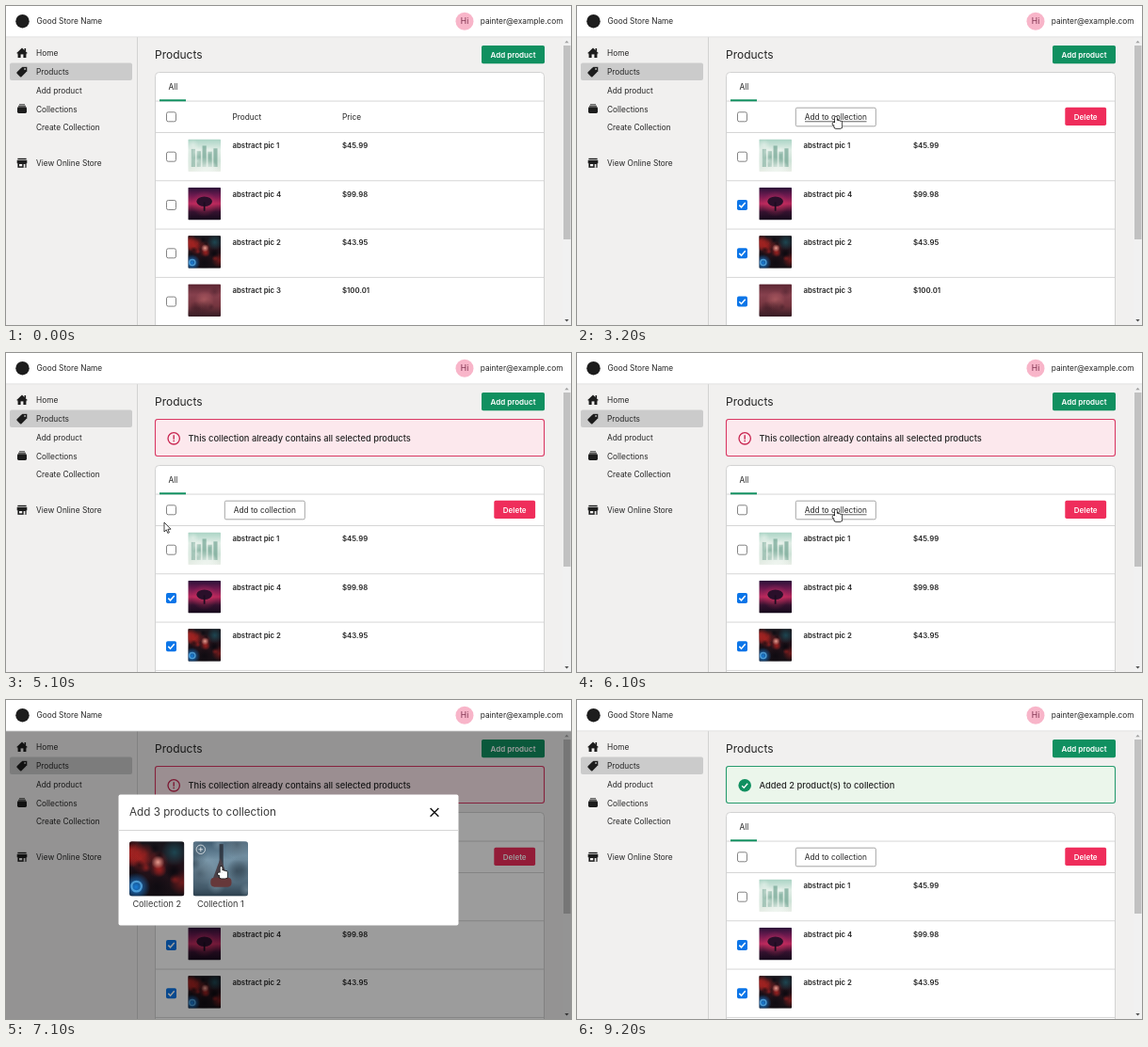
Animation, 600 px wide and 339 px high, one loop 9.3 s. Source, as an HTML page with a canvas:

```html
<!DOCTYPE html>
<html lang="en">
<head>
<meta charset="utf-8">
<title>Store products</title>
<style>
  html, body { margin: 0; width: 100%; height: 100%; overflow: hidden; }
  canvas { display: block; width: 600px; height: 339px; }
</style>
</head>
<body>
<canvas id="stage"></canvas>
<script>
const W = 600, H = 339, LOOP = 9300, STEP = 100, TAU = Math.PI * 2;
const canvas = document.getElementById('stage');
const ratio = window.devicePixelRatio || 1;
canvas.width = W * ratio;
canvas.height = H * ratio;
const c = canvas.getContext('2d');

const INK = '#252525', SOFT = '#3a3a3a', ICON = '#1d1d1d', GREEN = '#109060', RED = '#ef2d5b';
const PAGE = '#f1f0ef', LINE = '#d2d2d2', MARK = '#cbcbcb';
const TABLE = 70.5, ROWS = 134, ROW = 51.3, SHIFT = 49, THUMB = 58.4;

const menu = ['Home', 'Products', 'Add product', 'Collections', 'Create Collection', 'View Online Store'];
const menuIcons = [houseIcon, tagIcon, null, stackIcon, null, shopIcon];
const menuY = i => 50 + 19.8 * (i === 5 ? 5.9 : i);

const products = [
  { name: 'abstract pic 1', price: '$45.99', art: mist },
  { name: 'abstract pic 4', price: '$99.98', art: tree },
  { name: 'abstract pic 2', price: '$43.95', art: nebula },
  { name: 'abstract pic 3', price: '$100.01', art: dusk }
];
const collections = [{ name: 'Collection 2', art: nebula }, { name: 'Collection 1', art: sea }];

// Moments of the story
const FIRST_CHECK = 900, CHECK_GAP = 600;
const OPEN_1 = 3300, CLOSE_1 = 4900, OPEN_2 = 6200, CLOSE_2 = 7700;
const checkTime = i => i ? FIRST_CHECK + (i - 1) * CHECK_GAP : Infinity;

// Pointer targets
const checkSpot = i => ({ x: 175, y: ROWS + ROW * i + 26 });
const buttonSpot = shift => ({ x: 275, y: 117.5 + shift });
const thumbX = i => 131 + i * 67.6;
const thumbSpot = i => ({ x: thumbX(i) + 30, y: 177 });

// The pointer rests at each stop from arrive to leave and glides between stops
const stops = [
  { arrive: 400, leave: 400, to: { x: 232, y: 236 } },
  ...[1, 2, 3].map(i => ({ arrive: checkTime(i) - 100, leave: checkTime(i) + 100, to: checkSpot(i) })),
  { arrive: 3100, leave: OPEN_1, to: buttonSpot(0) },
  { arrive: 3900, leave: 4000, to: thumbSpot(1) },
  { arrive: 4600, leave: CLOSE_1, to: thumbSpot(0) },
  { arrive: 5100, leave: 5100, to: { x: 168, y: 180 } },
  { arrive: 5900, leave: OPEN_2, to: buttonSpot(SHIFT) },
  { arrive: 6800, leave: CLOSE_2, to: thumbSpot(1) },
  { arrive: 8100, leave: 8200, to: { x: 264, y: 111 } },
  { arrive: 9000, leave: 9000, to: { x: 0, y: H } }
];

const ease = p => p * p * (3 - 2 * p);
const mix = (a, b, p) => a + (b - a) * p;

function pointerAt(t) {
  const i = stops.findIndex(s => t < s.arrive);
  if (i < 1) return null;
  const from = stops[i - 1], next = stops[i];
  const p = ease(Math.max(0, (t - from.leave) / (next.arrive - from.leave)));
  return { x: mix(from.to.x, next.to.x, p), y: mix(from.to.y, next.to.y, p) };
}

const inside = (p, x, y, w, h) => !!p && p.x >= x && p.x <= x + w && p.y >= y && p.y <= y + h;
const overThumb = (p, i) => inside(p, thumbX(i), 150, THUMB, THUMB);
const overButton = (p, shift) => inside(p, 232, 108 + shift, 86, 20);

function random(seed) {
  return () => (seed = (seed * 16807) % 2147483647) / 2147483647;
}

function text(s, x, y, { size = 8.3, weight = 400, color = INK, align = 'left' } = {}) {
  c.font = `${weight} ${size}px Inter, sans-serif`;
  c.fillStyle = color;
  c.textAlign = align;
  c.fillText(s, x, y);
}

function paint(fill, stroke, width = 1) {
  if (fill) { c.fillStyle = fill; c.fill(); }
  if (stroke) { c.strokeStyle = stroke; c.lineWidth = width; c.stroke(); }
}

function rect(x, y, w, h, fill) {
  c.fillStyle = fill;
  c.fillRect(x, y, w, h);
}

function box(x, y, w, h, r, ...style) {
  c.beginPath();
  c.roundRect(x, y, w, h, r);
  paint(...style);
}

function disc(x, y, r, ...style) {
  c.beginPath();
  c.arc(x, y, r, 0, TAU);
  paint(...style);
}

function shape(points, ...style) {
  c.beginPath();
  points.forEach(([x, y]) => c.lineTo(x, y));
  c.closePath();
  paint(...style);
}

function triangle(x, y, half, height, fill) {
  shape([[x - half, y + height], [x, y], [x + half, y + height]], fill);
}

function at(x, y, draw, scale = 1, turn = 0) {
  c.save();
  c.translate(x, y);
  c.scale(scale, scale);
  c.rotate(turn);
  draw();
  c.restore();
}

function tick(x, y, size, width) {
  c.beginPath();
  c.moveTo(x - size, y);
  c.lineTo(x - size * .3, y + size * .7);
  c.lineTo(x + size, y - size * .8);
  paint(null, '#fff', width);
}

function cross(x, y, size, color, width, turn = 0) {
  at(x, y, () => {
    rect(-size, -width / 2, size * 2, width, color);
    rect(-width / 2, -size, width, size * 2, color);
  }, 1, turn);
}

// Pictures live in a unit square
function shade(...colors) {
  const g = c.createLinearGradient(0, 0, 0, 1);
  colors.forEach((k, i) => g.addColorStop(i / (colors.length - 1), k));
  rect(0, 0, 1, 1, g);
}

function glow(x, y, r, rgb, alpha) {
  const g = c.createRadialGradient(x, y, 0, x, y, r);
  g.addColorStop(0, `rgba(${rgb},${alpha})`);
  g.addColorStop(1, `rgba(${rgb},0)`);
  rect(0, 0, 1, 1, g);
}

function clouds(seed, count, radius, rgb, alpha, slope = 0) {
  const rnd = random(seed);
  for (let i = 0; i < count; i++) {
    const x = rnd();
    const y = slope ? .15 + x * slope + (rnd() - .5) * .4 : rnd();
    glow(x, y, radius * (.5 + rnd()), rgb, alpha);
  }
}

function mist() {
  shade('#a9d3c4', '#e2eee7', '#cfe3d8', '#e9eee7');
  for (let i = 0; i < 5; i++) {
    const top = .3 + .1 * Math.sin(i * 2.4);
    rect(.1 + i * .17, top, .12, .85 - top, 'rgba(86,146,126,.55)');
  }
  clouds(5, 6, .22, '240,246,241', .5);
  glow(.5, 1, .45, '240,246,241', .9);
}

function tree() {
  shade('#2a1238', '#6f1a50', '#b8285c', '#34122f', '#150a1b');
  glow(.5, .5, .4, '240,60,100', .45);
  c.beginPath();
  c.ellipse(.5, .43, .24, .15, 0, 0, TAU);
  paint('#2a0f2a');
  rect(.475, .45, .05, .27, '#1c0c20');
}

function nebula() {
  shade('#17151b', '#24121a', '#140f14');
  clouds(11, 14, .17, '195,38,34', .5, .7);
  clouds(23, 9, .16, '8,8,14', .6);
  glow(.82, .2, .25, '30,110,125', .55);
  glow(.52, .38, .12, '255,185,170', .8);
  glow(.12, .83, .26, '25,125,215', 1);
  disc(.13, .82, .09, null, 'rgba(110,200,255,.6)', .04);
}

function dusk() {
  shade('#5b2733', '#86404d', '#74353f', '#351c24');
  glow(.5, .5, .3, '215,120,120', .45);
  clouds(7, 6, .2, '50,22,32', .35);
}

function sea() {
  shade('#3f5b70', '#7391a4', '#5f7a8c', '#2c3f4d');
  clouds(31, 7, .22, '160,185,200', .4);
  clouds(17, 6, .2, '35,50,62', .45);
  rect(.48, .05, .07, .5, 'rgba(42,48,58,.85)');
  triangle(.5, .3, .14, .38, '#4a4148');
  box(.32, .66, .38, .17, .07, '#66383a');
}

function picture(art, x, y, size, radius) {
  c.save();
  c.beginPath();
  c.roundRect(x, y, size, size, radius);
  c.clip();
  at(x, y, art, size);
  c.restore();
}

function checkbox(x, y, on) {
  if (!on) return box(x + .5, y + .5, 10, 10, 1.8, '#fff', '#777', .9);
  box(x, y, 11, 11, 1.8, '#0b75e8');
  tick(x + 5.5, y + 5.6, 3.2, 1.5);
}

function houseIcon() {
  triangle(0, -5.5, 6, 5.8, ICON);
  for (const x of [-4.4, 1.4]) rect(x, 0, 3, 5, ICON);
  rect(-4.4, 0, 8.8, 1.4, ICON);
  rect(2.5, -5, 1.6, 3, ICON);
}

function tagIcon() {
  at(0, 0, () => box(-5.2, -3.4, 10, 6.8, [1, 3, 3, 1], ICON), 1, -TAU / 8);
  rect(.2, -5, 5.1, 5, ICON);
  disc(3.1, -2.9, .9, MARK);
}

function stackIcon() {
  box(-5, -2.2, 10, 6.7, 1.4, ICON);
  for (const i of [0, 1]) rect(i - 4, -3.6 - 1.4 * i, 8 - 2 * i, .9, ICON);
}

function shopIcon() {
  rect(-4.6, -5, 9.2, 1.3, ICON);
  rect(-5.3, -3, 10.6, 3.4, ICON);
  rect(-4.6, 0, 9.2, 5, ICON);
  rect(-3, 1.2, 3.2, 2.3, PAGE);
  rect(1.7, 1.2, 1.7, 3.8, PAGE);
}

function header() {
  rect(0, 0, W, 33, '#fff');
  rect(0, 32.5, W, .8, '#d9d9d9');
  disc(17.5, 16.2, 7.2, ICON);
  text('Good Store Name', 32.5, 19.3);
  disc(487, 16.3, 9.5, '#f8b5c9');
  text('Hi', 487, 19.4, { size: 8.5, color: '#7c304c', align: 'center' });
  text('painter@example.com', 591.5, 19.3, { align: 'right' });
}

function sidebar() {
  rect(139, 33, 1, H, LINE);
  box(4, 60.5, 130, 18.5, 2, MARK);
  menu.forEach((label, i) => {
    if (menuIcons[i]) at(17, menuY(i), menuIcons[i]);
    text(label, 32, menuY(i) + 3.1);
  });
}

function scrollbar(thumbEnd) {
  rect(591, 33, 9, H, '#f1f1f1');
  rect(592, 42, 7.5, thumbEnd - 42, '#c1c1c1');
  triangle(595.5, 36.8, 2.2, 2.5, '#a3a3a3');
  triangle(595.5, 335.5, 2.2, -2.5, '#505050');
}

function button(label, x, y, w, fill) {
  box(x, y, w, 19.2, 1.8, fill);
  text(label, x + w / 2, y + 12.7, { size: 8, weight: 600, color: '#fff', align: 'center' });
}

function banner(ok) {
  const x = 178.2, y = 90.8, mark = '#c82550';
  box(158.5, TABLE, 413, 39, 2.5, ok ? '#ebf6eb' : '#fce8ed', ok ? '#279b6e' : '#d93863', 1.1);
  if (ok) {
    disc(x, y, 6.8, GREEN);
    tick(x, y + .4, 3, 1.3);
  } else {
    disc(x, y, 6.2, null, mark, 1.3);
    rect(x - .7, y - 3.6, 1.4, 4.5, mark);
    rect(x - .7, y + 1.9, 1.4, 1.5, mark);
  }
  const message = ok ? 'Added 2 product(s) to collection' : 'This collection already contains all selected products';
  text(message, 193.5, 94.2, { size: 9.33, weight: 500 });
}

function actions(hover) {
  box(232.3, 108.2, 85, 19.6, 1.5, '#fff', '#9b9b9b', .9);
  text('Add to collection', 274.8, 121.3, { align: 'center' });
  if (hover) rect(242, 122.5, 65.5, .7, INK);
  button('Delete', 518.3, 107.8, 43.8, RED);
}

function table(t, hover) {
  box(158.5, TABLE, 413, 320, 4, '#fff', LINE);
  text('All', 172.5, 88.7);
  rect(159, 100.6, 412, .9, LINE);
  rect(163, 99.3, 28, 2, GREEN);
  checkbox(170, 112.3, false);
  if (t >= FIRST_CHECK) {
    actions(hover);
  } else {
    text('Product', 240.5, 121);
    text('Price', 357, 121);
  }
  products.forEach((p, i) => {
    const y = ROWS + i * ROW;
    const bold = { size: 7.8, weight: 600 };
    rect(159, y, 412, .9, LINE);
    checkbox(170, y + 20.7, t >= checkTime(i));
    picture(p.art, 193.3, y + 7.5, 34.7, 1);
    text(p.name, 240.5, y + 17.3, bold);
    text(p.price, 357, y + 17.3, bold);
  });
}

function modal(pointer) {
  rect(0, 33, W, H - 33, 'rgba(0,0,0,.39)');
  box(119.5, 100.5, 361, 139, 2, '#fff');
  rect(119.5, 138, 361, .9, LINE);
  text('Add 3 products to collection', 131, 123.3, { size: 11.7, color: SOFT });
  cross(455, 119.4, 6.2, '#111', 1.4, TAU / 8);
  collections.forEach(({ name, art }, i) => {
    const x = thumbX(i), ink = 'rgba(255,255,255,.75)';
    picture(art, x, 150.2, THUMB, 3);
    text(name, x + THUMB / 2, 220.3, { size: 9.2, color: SOFT, align: 'center' });
    if (!overThumb(pointer, i)) return;
    disc(x + 8.2, 158.8, 4.7, null, ink, .9);
    cross(x + 8.2, 158.8, 2.4, ink, .9);
  });
}

function arrow() {
  shape([[0, 0], [0, 10], [2.3, 7.9], [3.8, 11.4], [5.4, 10.7], [3.9, 7.3], [7, 7.2]], '#fff', '#151515', .8);
}

function hand() {
  c.beginPath();
  for (let i = 0; i < 4; i++) c.roundRect(i * 1.8 - 1, i ? 3.6 + i * .5 : 0, 1.9, 7, .9);
  c.roundRect(-3.6, 6.4, 4, 2.6, 1.2);
  c.roundRect(-1.8, 7, 8, 5.6, 2);
  paint(null, '#151515', 1.5);
  paint('#fff');
}

function render(t) {
  const pointer = pointerAt(t);
  const open = (t >= OPEN_1 && t < CLOSE_1) || (t >= OPEN_2 && t < CLOSE_2);
  const notice = t >= CLOSE_1;
  const shift = notice ? SHIFT : 0;
  const onButton = !open && t >= FIRST_CHECK && overButton(pointer, shift);
  const onThumb = open && collections.some((_, i) => overThumb(pointer, i));

  c.setTransform(ratio, 0, 0, ratio, 0, 0);
  rect(0, 0, W, H, PAGE);
  sidebar();
  text('Products', 158, 55.6, { size: 12 });
  button('Add product', 505, 42, 67, GREEN);
  if (notice) banner(t >= CLOSE_2);
  at(0, shift, () => table(t, onButton));
  scrollbar(notice ? 227 : 248);
  if (open) modal(pointer);
  header();
  if (pointer) at(pointer.x, pointer.y, onButton || onThumb ? hand : arrow);
}

function play(now) {
  render(Math.floor((now % LOOP) / STEP) * STEP);
  requestAnimationFrame(play);
}
requestAnimationFrame(play);
</script>
</body>
</html>
```
